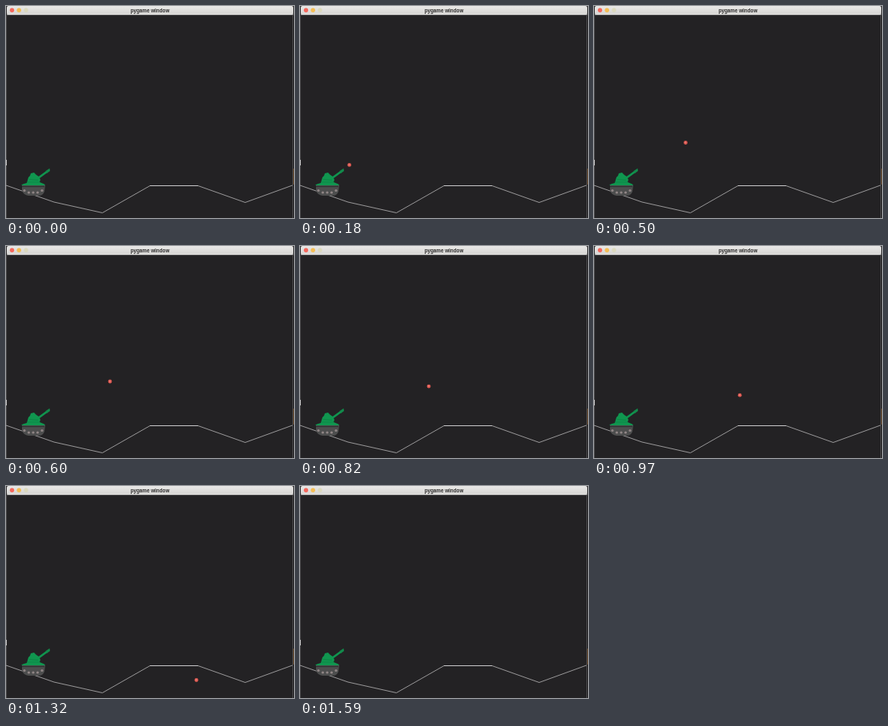
An HTML page that plays this animation: 360x266 px, repeating every 1690 ms.

```html
<!DOCTYPE html>
<html lang="en">
<head>
<meta charset="utf-8">
<title>Tank shot</title>
<style>
  html, body { margin: 0; width: 100%; height: 100%; overflow: hidden; background: #232224; }
  svg { display: block; width: 100vw; height: 100vh; }
  text { font: bold 6.3px "Liberation Sans", Arial, sans-serif; }
</style>
</head>
<body>
<svg viewBox="0 0 360 266">
  <defs>
    <linearGradient id="bar" x2="0" y2="1">
      <stop stop-color="#e9e8e7"/>
      <stop offset="1" stop-color="#d5d4d2"/>
    </linearGradient>
  </defs>

  <!-- Window -->
  <rect width="360" height="266" fill="#232224"/>
  <path d="M.5 12V266M358.5 12V266" stroke="#4b4a4c"/>
  <path d="M359.5 12V266" stroke="#1b1a1c"/>
  <path d="M.5 193v7" stroke="#c9c8c8"/>
  <path d="M359.5 204v20" stroke="#5d4023"/>
  <rect width="360" height="12" fill="#343335"/>
  <rect x="1" width="358" height="11" rx="2" fill="url(#bar)"/>
  <path d="M1 10.7H359" stroke="#f0efee" stroke-width=".7"/>
  <circle cx="7.5" cy="5.2" r="2.7" fill="#f4675d"/>
  <circle cx="16.2" cy="5.2" r="2.7" fill="#f3bd55"/>
  <circle cx="25" cy="5.2" r="2.6" fill="#dcd9bd"/>
  <text x="180" y="7.8" text-anchor="middle" fill="#2d2c2c">pygame window</text>

  <!-- Ground -->
  <g fill="none" stroke="#a5a4a5" stroke-width=".9">
    <path d="M0 225L60 246L120.5 259.5L180 225.5M240 225.5L299 246.5L358 225"/>
    <path d="M180 225.5H240" stroke="#c8c7c8" stroke-width="1.1"/>
  </g>

  <!-- Tank -->
  <path d="M20 225H49L48 233Q46 238 41 238H28Q22 237 20 232Z" fill="#4d4e4e"/>
  <path d="M20 226.5H48" stroke="#303433" stroke-width="1.4"/>
  <g id="wheels" fill="#8f8585"></g>
  <path d="M19 225L21 223.5L26 222L28 215L30 213L31 210L35 209L38 212L41 214L43 218L42 221L48 223.5L49 225Z" fill="#10964f"/>
  <path d="M38 217.5L51 208" stroke="#10964f" stroke-width="2.6"/>
  <path d="M49.5 207L54.5 203.8L55 207L51 210Z" fill="#128a4b"/>
  <path d="M29 217.5L40 218.5M27 221H42" stroke="#0c7f43" stroke-width=".7"/>

  <g id="ball">
    <circle r="2.4" fill="#d95750"/>
    <circle cx="-.2" cy="-.2" r="1" fill="#f08079"/>
  </g>
</svg>
<script>
  const LOOP = 1690;
  const ticks = [60, 130, 200, 260, 330, 400, 500, 550, 600, 700, 760, 820, 920, 970,
    1120, 1190, 1250, 1320, 1390, 1460, 1520, 1590];
  const track = [[60, 52], [400, 99], [600, 130], [820, 161], [1120, 203.5], [1320, 238], [1690, 300]];
  const ball = document.getElementById("ball");

  document.getElementById("wheels").innerHTML = [23, 28.5, 34, 39.5, 45]
    .map((x, i) => `<circle cx="${x}" cy="${i % 4 ? 234 : 231.5}" r="1.6"/>`).join("");

  function ballX(time) {
    const i = track.findIndex(([t]) => t > time);
    const [t0, x0] = track[i - 1], [t1, x1] = track[i];
    return x0 + (x1 - x0) * (time - t0) / (t1 - t0);
  }

  function draw(now) {
    const time = now % LOOP;
    const tick = ticks.findLast(t => t <= time);
    ball.style.display = tick === undefined ? "none" : "";
    if (tick !== undefined) {
      const x = ballX(tick);
      const y = 170 + 0.0063 * (x - 130) ** 2;
      ball.setAttribute("transform", `translate(${x} ${y})`);
    }
  }

  const start = performance.now();
  function frame() {
    draw(performance.now() - start);
    requestAnimationFrame(frame);
  }
  frame();
</script>
</body>
</html>
```
